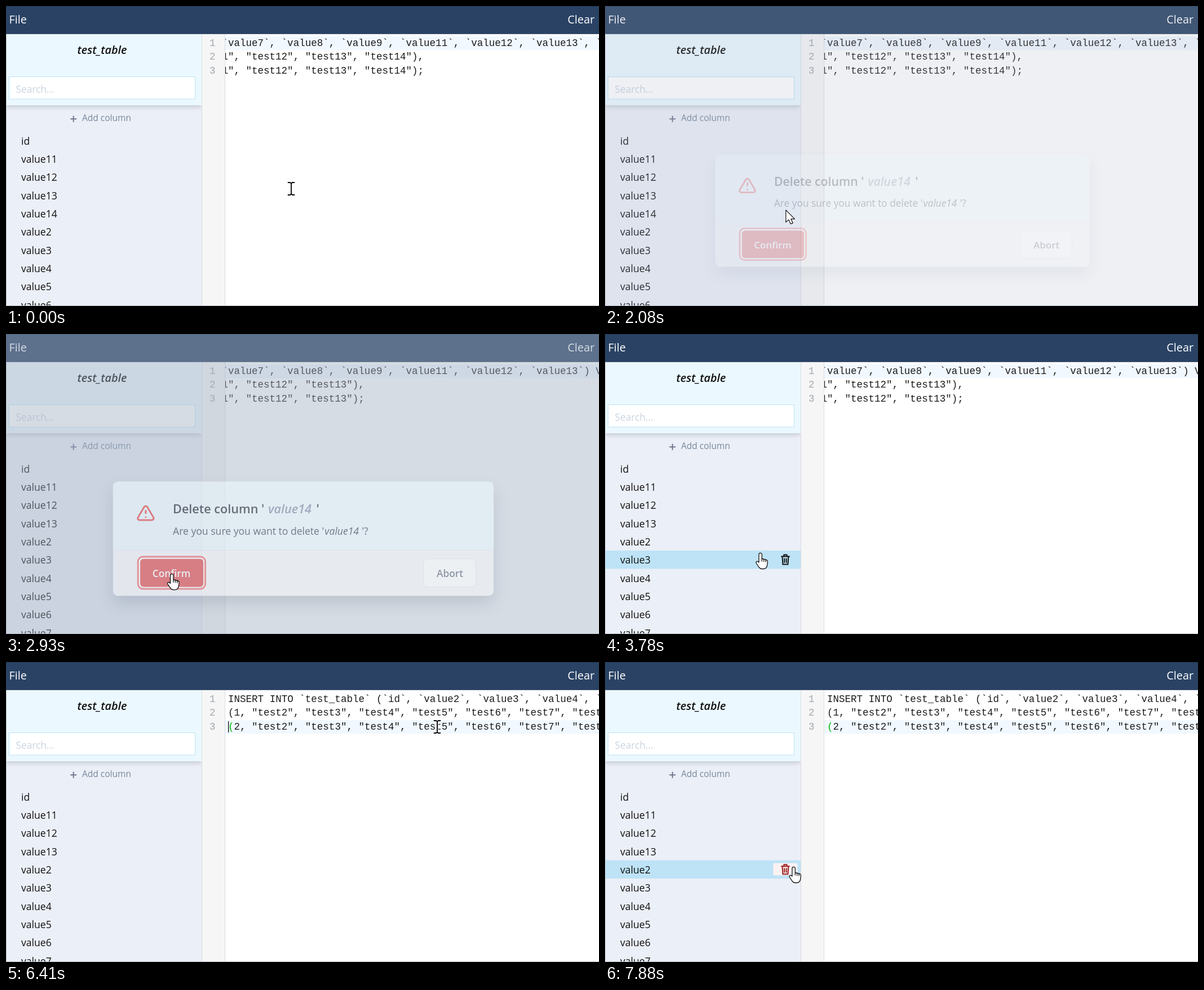
These frames come from a looping animation (1052x532 px, 8000 ms). An HTML page:

```html
<!DOCTYPE html>
<html lang="en">
<head>
<meta charset="utf-8">
<title>Table editor</title>
<style>
  html, body { margin: 0; width: 100%; height: 100%; overflow: hidden; background: #fff; }
  svg { display: block; width: 1052px; height: 532px; }
  text { font: 17.6px "Open Sans", "Noto Sans", sans-serif; white-space: pre; }
  .head { font-size: 19.8px; fill: #fff; }
  .code text { font: 17.55px "Liberation Mono", monospace; fill: #1c1c1c; }
  .code .num { fill: #a3a8ae; text-anchor: end; }
  .title { font-size: 19.8px; font-style: italic; font-weight: 600; text-anchor: middle; }
  .panel { filter: drop-shadow(0 3px 4px rgba(0, 0, 0, .16)); }
  .dialog { filter: drop-shadow(0 14px 14px rgba(40, 55, 80, .25)); }
  .question { font-size: 22px; font-weight: 600; fill: #1a202c; }
  .button { font-size: 17.6px; font-weight: 600; text-anchor: middle; }
  .em { font-style: italic; }
  .line { fill: none; stroke-linecap: round; stroke-linejoin: round; }
</style>
</head>
<body>
<svg viewBox="0 0 1052 532">
  <defs>
    <clipPath id="view"><rect x="389" y="50" width="663" height="482"/></clipPath>
  </defs>
  <rect width="1052" height="532" fill="#fff"/>

  <!-- sidebar -->
  <rect y="50" width="347" height="482" fill="#ebeff7"/>
  <rect id="hover" width="347" height="32.4" fill="#bee3f6"/>
  <g id="rows" fill="#111"></g>
  <g id="trash">
    <rect id="pill" x="298.5" y="5" width="43" height="21.5" rx="2" fill="#fdf2f2"/>
    <path id="bin" class="line" stroke-width="2" d="M313 10.6H327M314.6 11l.9 13.6h9l.9-13.6M317.4 10.3V7.6h5.2v2.7M318.3 14.6v6.4M321.7 14.6v6.4"/>
  </g>
  <rect class="panel" y="50" width="347" height="126" fill="#ebf8ff"/>
  <text class="title" x="170.5" y="85" fill="#111">test_table</text>
  <rect x="5.5" y="125.5" width="330" height="39.5" fill="#fff" stroke="#bee3f0"/>
  <text x="17.5" y="153.5" style="font-size:17.3px" fill="#cbd5e0">Search...</text>
  <path class="line" d="M115 200.3h9.4M119.7 195.6v9.4" stroke="#70778f" stroke-width="2"/>
  <text x="135" y="204" style="font-size:15.5px" fill="#78889c">Add column</text>

  <!-- editor -->
  <g class="code">
    <rect x="347" y="50" width="42" height="482" fill="#f6f6f6"/>
    <path d="M347.5 50V532M388.5 50V532" stroke="#d9dde0"/>
    <rect id="active" x="389" width="663" height="24.4" fill="#f1f8ff"/>
    <g id="numbers"></g>
    <g clip-path="url(#view)">
      <g id="lines"></g>
      <rect id="caret" y="105" width="1.2" height="20" fill="#000"/>
    </g>
  </g>

  <!-- header -->
  <rect width="1052" height="49.5" fill="#2a4365"/>
  <path d="M0 .5H1052M0 49H1052" stroke="#1f3554"/>
  <text class="head" x="5.5" y="31">File</text>
  <text class="head" x="1044" y="31" text-anchor="end">Clear</text>
  <path d="M.5 50V531.5H1052" fill="none" stroke="#b4bac2"/>

  <!-- dialog -->
  <g id="modal">
    <rect id="shade" width="1052" height="532" fill="#a0aec0"/>
    <g id="dialog">
      <g class="dialog">
        <rect x="184" y="260" width="687" height="206" rx="9" fill="#f5f6f8"/>
        <path d="M184 383.5V269a9 9 0 0 1 9-9H862a9 9 0 0 1 9 9V383.5Z" fill="#ebf8ff"/>
      </g>
      <path d="M184 384H871" stroke="#e3e8ee"/>
      <path class="line" stroke="#e53e3e" stroke-width="3" d="M243 312.5v4.5M243 324v.2M232 329.5H254c2.7 0 4.2-2.6 2.9-4.900L246 306c-1.300-2.300-4.700-2.300-6 0L229.100 324.600C227.800 326.900 229.300 329.500 232 329.500Z"/>
      <text class="question" x="292" y="317">Delete column '<tspan class="em" x="464" fill="#7c88a3">value14</tspan><tspan x="551">'</tspan></text>
      <text x="292" y="355.500" style="font-size:17.900px" fill="#2d3748">Are you sure you want to delete '<tspan class="em" x="566">value14</tspan><tspan x="633">'?</tspan></text>
      <rect x="229" y="395.500" width="121.500" height="58" rx="9" fill="#fff" stroke="#ee6666" stroke-width="3"/>
      <rect x="233" y="399.500" width="114" height="50.500" rx="6" fill="#e04141"/>
      <text class="button" x="289.500" y="432.500" fill="#fff">Confirm</text>
      <rect x="744.500" y="399.500" width="94.500" height="50.500" rx="7" fill="#fff" stroke="#dfe4ea"/>
      <text class="button" x="792" y="432.500" fill="#5a667a">Abort</text>
    </g>
  </g>

  <!-- pointer -->
  <g id="pointer" stroke-linejoin="round" stroke-linecap="round">
    <path id="arrow" d="M0 0V21.500L5 17 8.500 24.600 12.300 23 9 15.700H15.600Z" fill="#fff" stroke="#111" stroke-width="1.200"/>
    <g id="hand" stroke="#111" stroke-width="1.300">
      <path fill="#fff" d="M-3 3a2.700 2.700 0 0 1 5.400 0V10.500l6.800 1.600c2.400.6 3.500 1.700 3.300 4.100l-.7 5.600c-.5 3.700-2.600 6.700-6.500 6.700H2c-2.500 0-3.600-1.200-5-3.200L-7.600 18.500c-1.200-2 .8-4.200 2.800-3l1.800 1.600Z"/>
      <path fill="none" d="M2.400 10.500V15M5.800 11.500V15.500M9.100 12.300V16"/>
    </g>
    <g id="beam" fill="none">
      <path stroke="#fff" stroke-width="3.600" d="M-5.500-11H-2L0-9.500 2-11H5.500M0-9.500V9.500M-5.500 11H-2L0 9.500 2 11H5.500"/>
      <path stroke="#000" stroke-width="1.800" d="M-5.500-11H-2L0-9.500 2-11H5.500M0-9.500V9.500M-5.500 11H-2L0 9.500 2 11H5.500"/>
    </g>
  </g>
</svg>
<script>
const LOOP = 8000, ROW_TOP = 254.6, ROW_H = 32.35;
const CHAR = 10.53, LINE_H = 24.4, TEXT_X = 394, SCROLL = 873.3;
const $ = id => document.getElementById(id);
const show = (id, on) => $(id).style.display = on ? '' : 'none';
const attr = (id, name, value) => $(id).setAttribute(name, value);
const clamp = v => Math.min(1, Math.max(0, v));

// Bursts of redraws: first, last, count
const bursts = [
  [0, 0, 1], [90, 540, 7], [860, 1010, 3], [1240, 1620, 6], [1770, 1920, 3],
  [2080, 2690, 9], [2860, 3620, 11], [3700, 4010, 5], [4320, 4390, 2],
  [4560, 5320, 11], [5400, 5560, 3], [5710, 5710, 1], [5860, 5860, 1],
  [6100, 6100, 1], [6410, 7190, 11], [7270, 7880, 9]
];
const ticks = bursts.flatMap(([from, to, n]) =>
  Array.from({ length: n }, (_, i) =>
    n > 1 ? Math.floor((from + (to - from) * i / (n - 1)) / 10) * 10 : from));

// Pointer path: time, x, y
const path = [
  [0, 506, 324], [20, 506, 324], [300, 300, 330], [540, 150, 272], [790, 150, 272],
  [1010, 144, 357], [1170, 144, 357], [1240, 180, 355], [1620, 336, 366],
  [1700, 336, 366], [1920, 318, 359], [2010, 318, 359], [2230, 327, 368],
  [2690, 296, 428], [2860, 296, 428], [3620, 280, 397], [3770, 276, 388],
  [4010, 272, 344], [4250, 272, 344], [4390, 285, 372], [4490, 285, 372],
  [5090, 405, 347], [5320, 762, 262], [5400, 814, 190], [5560, 775, 107],
  [5710, 777, 101], [5860, 764, 109], [6100, 765, 115], [6410, 765, 115],
  [7110, 285, 368], [7190, 260, 364], [7880, 335, 363], [LOOP, 335, 363]
];

function pointerAt(t) {
  const i = path.findIndex(p => p[0] > t);
  const [t0, x0, y0] = path[i - 1], [t1, x1, y1] = path[i];
  const k = (t - t0) / (t1 - t0);
  return [x0 + (x1 - x0) * k, y0 + (y1 - y0) * k];
}

function columns(deleted) {
  const tail = deleted ? [11, 12, 13] : [11, 12, 13, 14];
  return { tail, list: ['id', ...[...tail, 2, 3, 4, 5, 6, 7].map(n => 'value' + n)] };
}

function drawData(deleted, scrolled, matched) {
  const { tail, list } = columns(deleted);
  $('rows').innerHTML = list.map((name, i) =>
    `<text x="27" y="${ROW_TOP + ROW_H * (i - 1) + 23.4}">${name}</text>`).join('');

  const nums = [2, 3, 4, 5, 6, 7, 8, 9, ...tail];
  const tests = nums.map(n => `"test${n}"`).join(', ');
  const open = matched ? '<tspan fill="#0b0">(</tspan>' : '(';
  const code = [
    'INSERT INTO `test_table` (`id`, ' + nums.map(n => '`value' + n + '`').join(', ') + ') VALUES',
    `(1, ${tests}),`,
    `${open}2, ${tests});`
  ];
  const x = TEXT_X - (scrolled ? SCROLL : 0);
  $('lines').innerHTML = code.map((line, i) =>
    `<text x="${x}" y="${71 + LINE_H * i}">${line}</text>`).join('');
}

$('numbers').innerHTML = [1, 2, 3].map((n, i) =>
  `<text class="num" x="371.5" y="${71 + LINE_H * i}">${n}</text>`).join('');

function draw(t) {
  const deleted = t >= 2930, scrolled = t < 6100, clicked = t >= 5710;
  drawData(deleted, scrolled, !scrolled);
  attr('active', 'y', 54 + (clicked ? 2 * LINE_H : 0));

  // Dialog
  const modal = t >= 2080 && t < 3000;
  const p = t < 2860
    ? 1 - Math.pow(1 - clamp((t - 2050) / 300), 2.7)
    : 1 - clamp((t - 2800) / 200) ** 2;
  show('modal', modal);
  attr('shade', 'opacity', .75 * p);
  attr('dialog', 'opacity', p);
  attr('dialog', 'transform', `translate(527.5 363) scale(${.954 + .05 * p}) translate(-527.5 -363)`);

  // Pointer and hovered row
  const [x, y] = pointerAt(t);
  const row = Math.floor((y - ROW_TOP) / ROW_H), top = ROW_TOP + row * ROW_H;
  const hover = !modal && x < 347 && row >= -1;
  const onBin = hover && x > 298 && x < 342 && y > top + 5 && y < top + 27;
  show('hover', hover);
  show('trash', hover);
  show('pill', onBin);
  attr('hover', 'y', top);
  attr('trash', 'transform', `translate(0 ${top})`);
  attr('bin', 'stroke', onBin ? '#9b1c1c' : '#111');

  const onConfirm = modal && x > 233 && x < 347 && y > 399 && y < 450;
  const kind = hover || onConfirm ? 'hand' : modal || x < 406 ? 'arrow' : 'beam';
  ['hand', 'arrow', 'beam'].forEach(k => show(k, k === kind));
  attr('pointer', 'transform', `translate(${x} ${y})`);
}

function blink(t) {
  const since = t - (t < 6100 ? 5710 : 6100);
  show('caret', t >= 5710 && Math.floor(since / 530) % 2 === 0);
  const end = 4 + 8 * 9 + 3 * 10;
  attr('caret', 'x', t < 6100 ? TEXT_X + end * CHAR - SCROLL : TEXT_X);
}

let last = -1;
function frame() {
  const t = performance.now() % LOOP;
  const tick = ticks.filter(s => s <= t).pop();
  if (tick !== last) draw(last = tick);
  blink(t);
  requestAnimationFrame(frame);
}
frame();
</script>
</body>
</html>
```
